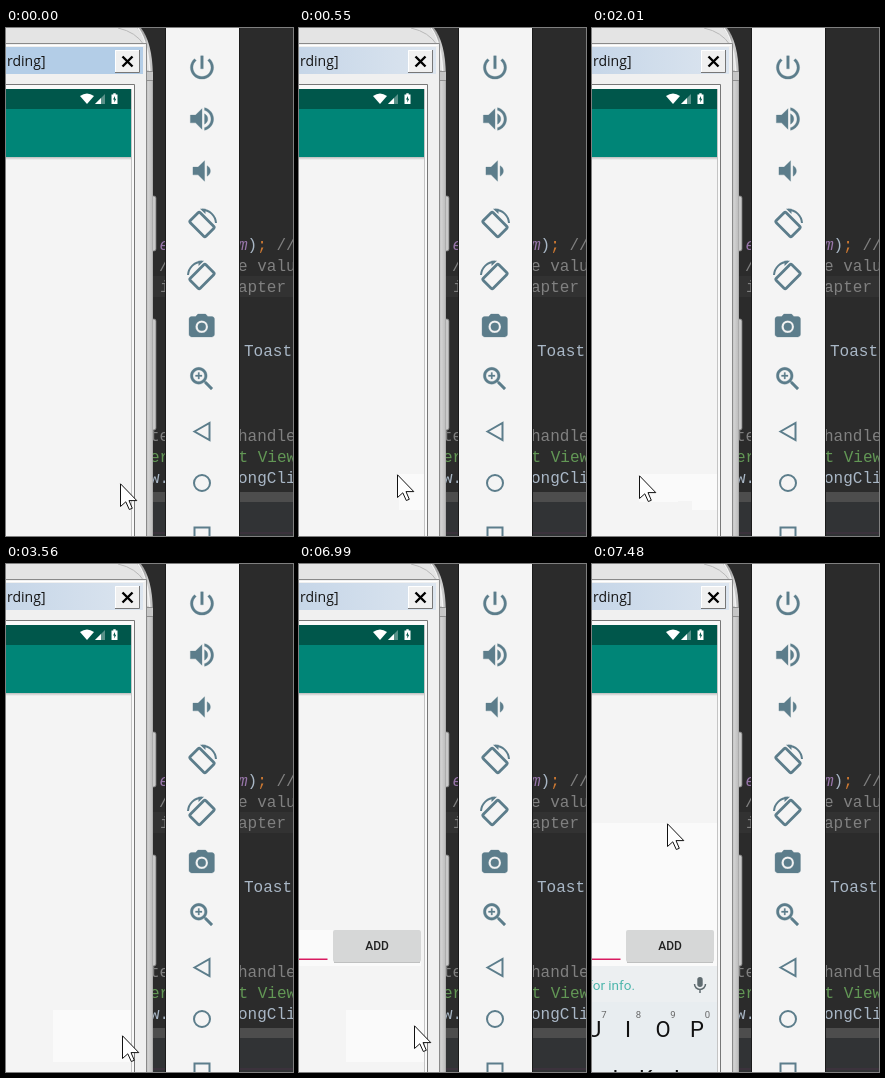
Recreate the animation shown at these times as an HTML page. Size 287x508 px, loop 8 s.

```html
<!DOCTYPE html>
<html lang="en">
<head>
<meta charset="utf-8">
<title>Emulator session</title>
<style>
html, body { margin: 0; width: 100%; height: 100%; overflow: hidden; background: #2b2b2b; }
svg { display: block; width: 100vw; height: 100vh; }
text { white-space: pre; }
.code { font: 16px "Liberation Mono", monospace; fill: #a9b7c6; }
.note { fill: #808080; }
.doc { fill: #629755; }
.field { fill: #9876aa; font-style: italic; }
.ui { font-family: Roboto, sans-serif; }
.icons { fill: #5c7d8b; stroke: #5c7d8b; stroke-width: .25; }
.line { fill: none; stroke: #5c7d8b; stroke-width: 2; }
.patch { fill: #fafafa; }
.key { font-size: 22px; fill: #111; text-anchor: middle; }
.hint { font-size: 9.5px; fill: #666; text-anchor: middle; }

/* every change is a hard step on one 8 s clock */
.step { animation: 8s step-end infinite; }
.trail1 { animation-name: at270; }
.active { animation-name: blur; }
.trail2 { animation-name: at1230; }
.trail3 { animation-name: at1890; }
.trail4 { animation-name: at3410; }
.form { animation-name: at5240; }
.trail5 { animation-name: at7110; }
.trail6 { animation-name: at7360; }
.board { animation-name: board; }
.cursor { animation-name: cursor; }

@keyframes at270 { 0% { visibility: hidden } 3.375%, to { visibility: visible } }
@keyframes blur { 0% { visibility: visible } 6.875%, to { visibility: hidden } }
@keyframes at1230 { 0% { visibility: hidden } 15.375%, to { visibility: visible } }
@keyframes at1890 { 0% { visibility: hidden } 23.625%, to { visibility: visible } }
@keyframes at3410 { 0% { visibility: hidden } 42.625%, to { visibility: visible } }
@keyframes at5240 { 0% { visibility: hidden } 65.5%, to { visibility: visible } }
@keyframes at7110 { 0% { visibility: hidden } 88.875%, to { visibility: visible } }
@keyframes at7360 { 0% { visibility: hidden } 92%, to { visibility: visible } }
@keyframes board {
  0% { visibility: hidden; transform: translateY(30px) }
  92% { visibility: visible; transform: translateY(30px) }
  93.5%, to { visibility: visible; transform: none }
}
@keyframes cursor {
  0% { transform: translate(114px, 455px) }
  1.875% { transform: translate(104px, 449px) }
  3.375% { transform: translate(98px, 446px) }
  15.375% { transform: translate(68px, 446px) }
  23.625% { transform: translate(54px, 446px) }
  25.125% { transform: translate(47px, 447px) }
  42.625% { transform: translate(113px, 471px) }
  44.5% { transform: translate(116px, 471px) }
  87.375% { transform: translate(115px, 461px) }
  88.875% { transform: translate(88px, 351px) }
  92%, to { transform: translate(75px, 259px) }
}
</style>
</head>
<body>
<svg viewBox="0 0 287 508" preserveAspectRatio="none">
  <defs>
    <linearGradient id="bezel" x1="139" x2="148" y1="0" y2="0" gradientUnits="userSpaceOnUse">
      <stop offset="0" stop-color="#a8a8a8"/>
      <stop offset=".35" stop-color="#d2d2d2"/>
      <stop offset=".75" stop-color="#c0c0c0"/>
      <stop offset="1" stop-color="#858585"/>
    </linearGradient>
    <linearGradient id="idle">
      <stop offset="0" stop-color="#c6d6e8"/>
      <stop offset="1" stop-color="#dce5ef"/>
    </linearGradient>
    <linearGradient id="shade" x2="0" y2="1">
      <stop offset="0" stop-color="#bcbcbc"/>
      <stop offset="1" stop-color="#f4f4f4"/>
    </linearGradient>
    <clipPath id="screen"><path d="M0 61H125V508H0z"/></clipPath>
  </defs>

  <!-- code editor -->
  <path fill="#2b2b2b" d="M0 0H287V508H0z"/>
  <path fill="#323232" d="M147 248H287V269H147z"/>
  <g class="code">
    <text class="field" x="153.500" y="222">e</text>
    <text x="232" y="222"><tspan class="field">m</tspan>)<tspan fill="#cc7832">;</tspan> <tspan class="note">//</tspan></text>
    <g class="note">
      <text x="153" y="243">/</text><text x="232" y="243">e value</text>
      <text x="154" y="264">i</text><text x="232" y="264">apter</text>
      <text x="144" y="413">te</text><text x="232" y="413">handle</text>
    </g>
    <text x="238" y="328">Toast</text>
    <g class="doc"><text x="144" y="434">er</text><text x="232.500" y="434">t View</text></g>
    <text x="144" y="455">w.</text><text x="232" y="455">ongCli</text>
  </g>
  <path fill="#4d4d4d" d="M147 464H287V474H147z"/>
  <path fill="#313335" d="M147 474H287V508H147z"/>
  <path fill="#3b323c" d="M147 504H287V506H147z"/>

  <!-- phone body -->
  <g fill="#c9c9c9" stroke="#777" stroke-width=".8">
    <rect x="144" y="168" width="6" height="55" rx="2"/>
    <rect x="144" y="291" width="6" height="111" rx="2"/>
  </g>
  <path fill="url(#bezel)" d="M0 0H135Q146 14 147 46V508H0z"/>
  <path fill="#e4e4e4" d="M0 0H131Q142 14 143 42H0z"/>
  <path fill="none" stroke="#f2f2f2" stroke-width="1.500" d="M132 0Q143 15 144 50"/>
  <path fill="none" stroke="#b8b8b8" d="M112 0Q130 4 138 17"/>
  <path fill="#8f8f8f" d="M141 43H147V53H141z"/>
  <path fill="#c6c6c6" d="M141 44H147V52H141z"/>

  <!-- emulator window -->
  <path fill="#f0f0f0" d="M0 16H140V508H0z"/>
  <path fill="none" stroke="#fff" d="M0 17.500H138.500"/>
  <path fill="none" stroke="#8a8a8a" d="M0 15.500H140.500V508"/>
  <path fill="url(#idle)" d="M0 19H137V46H0z"/>
  <path class="step active" fill="#b3cde7" d="M0 19H137V46H0z"/>
  <text x="39.500" y="38" text-anchor="end" font-family="'Open Sans', sans-serif" font-size="14" fill="#151515">rding]</text>
  <path fill="#f0f0f0" d="M109 22H134V45H109z"/>
  <path fill="none" stroke="#fff" d="M109.500 44V22.500H133"/>
  <path fill="none" stroke="#777" d="M109 44.500H133.500V22"/>
  <path fill="none" stroke="#000" stroke-width="2.400" d="M116.500 28.500L126.500 38.500M126.500 28.500L116.500 38.500"/>
  <path fill="#fafafa" d="M0 57H128V508H0z"/>
  <path fill="none" stroke="#777" d="M0 56.500H128.500V508"/>
  <path fill="none" stroke="#c4c4c4" d="M125.500 61V508"/>

  <!-- app -->
  <g clip-path="url(#screen)">
    <path fill="#f4f4f4" d="M0 61H126V508H0z"/>
    <path fill="#008577" d="M0 81H126V129H0z"/>
    <path fill="#00574b" d="M0 61H126V81H0z"/>
    <path fill="url(#shade)" d="M0 129H126V132H0z"/>
    <g fill="#fff">
      <path d="M74 68Q81 63 88 68L81 76z"/>
      <path fill-opacity=".35" d="M89 76L99 66V76z"/>
      <path d="M89 76L95 70V76z"/>
      <path fill-rule="evenodd" d="M105.500 66.500H107.300V65.300H109.700V66.500H111.500V76H105.500zM109 68L107 71.500H108.300V74.500L110.200 70.700H109z"/>
    </g>

    <path class="patch step trail1" d="M100 446H126V482H100z"/>
    <path class="patch step trail2" d="M68 446H116V473H68z"/>
    <path class="patch step trail3" d="M47 446H86V474H47z"/>
    <path class="patch step trail4" d="M47 447H126V498H47z"/>
    <path class="patch step trail5" d="M88 351H126V498H88z"/>
    <path class="patch step trail6" d="M0 259H126V508H0z"/>

    <g class="step form">
      <path class="patch" d="M0 366H122V402H0z"/>
      <path fill="#bfc0c0" d="M35 397H121V399H35z"/>
      <rect x="34" y="366" width="88" height="32" rx="2" fill="#d6d7d7"/>
      <text class="ui" x="78" y="386" text-anchor="middle" font-size="12" font-weight="500" fill="#222">ADD</text>
      <path fill="#d81b60" d="M0 394.500H28.500V396H0z"/>
    </g>

    <g class="step board ui">
      <path fill="#e8edf0" d="M0 402H126V540H0z"/>
      <path fill="#eceff1" d="M0 402H126V438H0z"/>
      <text x="43" y="426" text-anchor="end" font-size="13.500" fill="#4db6ac">for info.</text>
      <rect x="105.300" y="413" width="5.400" height="10" rx="2.700" fill="#5f6b70"/>
      <path fill="none" stroke="#5f6b70" stroke-width="1.500" d="M102.500 420A5.500 5.500 0 0 0 113.500 420M108 425.500V429"/>
      <g class="key">
        <text x="2" y="473">U</text><text x="36" y="473">I</text>
        <text x="71" y="473">O</text><text x="105" y="473">P</text>
        <text x="20" y="522">J</text><text x="54" y="522">K</text><text x="88" y="522">L</text>
      </g>
      <g class="hint">
        <text x="12" y="454">7</text><text x="46.500" y="454">8</text>
        <text x="81" y="454">9</text><text x="115.500" y="454">0</text>
      </g>
    </g>
  </g>

  <!-- emulator toolbar -->
  <path fill="#1a1a1a" d="M159 0H234V508H159z"/>
  <path fill="#f4f4f4" d="M160 0H233V508H160z"/>
  <g class="icons">
    <path transform="translate(180.500 24) scale(1.290)" d="M13 3h-2v10h2V3zm4.830 2.170l-1.420 1.420C17.990 7.860 19 9.810 19 12c0 3.870-3.130 7-7 7s-7-3.130-7-7c0-2.190 1.010-4.140 2.580-5.420L6.170 5.170C4.230 6.820 3 9.260 3 12c0 4.970 4.030 9 9 9s9-4.030 9-9c0-2.740-1.230-5.180-3.170-6.830z"/>
    <path transform="translate(180.500 75.500) scale(1.290)" d="M3 9v6h4l5 5V4L7 9H3zm13.500 3c0-1.770-1.020-3.290-2.500-4.030v8.050c1.480-.73 2.500-2.250 2.500-4.020zM14 3.230v2.060c2.890.86 5 3.540 5 6.710s-2.110 5.850-5 6.710v2.060c4.010-.91 7-4.490 7-8.770s-2.990-7.860-7-8.770z"/>
    <path transform="translate(180.500 127.500) scale(1.290)" d="M18.500 12c0-1.770-1.020-3.290-2.500-4.030v8.050c1.480-.73 2.500-2.250 2.500-4.020zM5 9v6h4l5 5V4L9 9H5z"/>
    <path fill-rule="evenodd" transform="translate(180.500 283.500) scale(1.270)" d="M9 2L7.170 4H4c-1.100 0-2 .9-2 2v12c0 1.100.9 2 2 2h16c1.100 0 2-.9 2-2V6c0-1.100-.9-2-2-2h-3.170L15 2H9zm3 15a5 5 0 1 1 0-10a5 5 0 0 1 0 10z"/>
    <circle cx="195.800" cy="298.800" r="4"/>
    <path transform="translate(180.500 335.500) scale(1.290)" d="M15.500 14h-.79l-.28-.27C15.410 12.590 16 11.110 16 9.500 16 5.910 13.090 3 9.500 3S3 5.910 3 9.500 5.910 16 9.500 16c1.610 0 3.090-.59 4.230-1.570l.27.28v.79l5 4.990L20.490 19l-4.990-5zm-6 0C7.010 14 5 11.990 5 9.500S7.010 5 9.500 5 14 7.010 14 9.500 11.990 14 9.500 14zM12 10h-2v2H9v-2H7V9h2V7h1v2h2v1z"/>
  </g>
  <g class="line">
    <g id="turn">
      <rect x="185" y="189.500" width="22" height="14" rx="1.500" stroke-width="2.800" transform="rotate(45 196 196.500)"/>
      <path d="M196 181.800A14 14 0 0 1 210 195"/>
      <path fill="#5c7d8b" stroke="none" d="M194 180.800H199.500V186z"/>
    </g>
    <use href="#turn" transform="translate(392 52) scale(-1 1)"/>
    <path d="M188.500 403.500L203.500 395V412z"/>
    <circle cx="196" cy="455" r="8"/>
    <path d="M188.500 515V499.500H203.500V515"/>
  </g>

  <path class="step cursor" fill="#fff" stroke="#111" d="M.5 .8V23.500L5.800 18.800L9.300 26.500L12.300 25.300L9 17.600H16.800z"/>
</svg>
</body>
</html>
```
